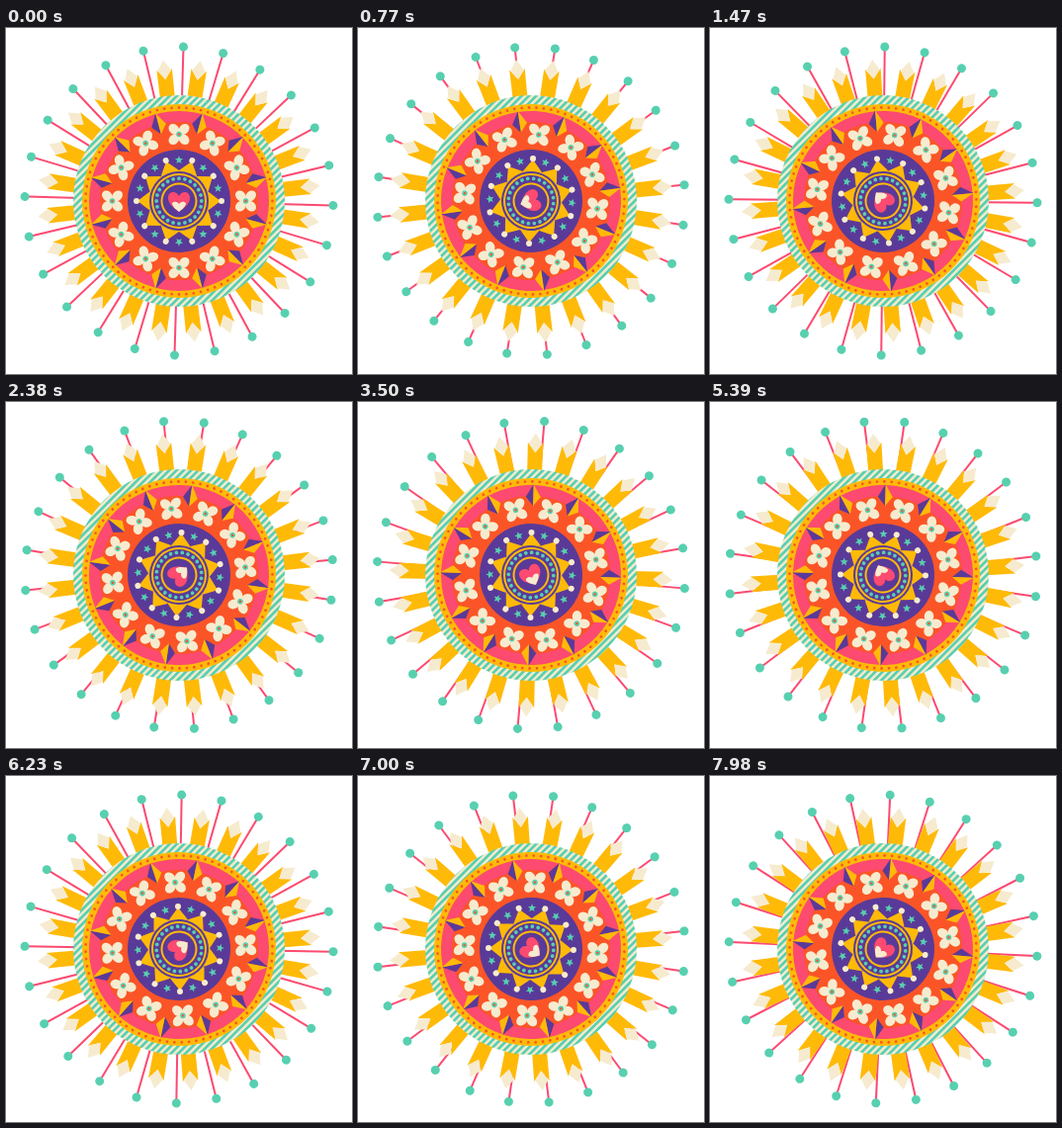
Write an HTML page that moves like this. It is 350 px wide and 350 px high and loops after 8000 ms.

```html
<!DOCTYPE html>
<html lang="en">
<head>
<meta charset="utf-8">
<title>Turning mandala</title>
<style>
  html, body { margin: 0; height: 100%; overflow: hidden; background: #fff; }
  svg { display: block; width: 100vw; height: 100vh; }
</style>
</head>
<body>
<svg viewBox="-175 -175 350 350">
  <defs>
    <pattern id="hatch" width="5.2" height="5.2" patternUnits="userSpaceOnUse" patternTransform="rotate(45)">
      <rect width="5.2" height="5.2" fill="#f6ebcf"/>
      <rect width="2.7" height="5.2" fill="#57d0b0"/>
    </pattern>
  </defs>
</svg>
<script>
const TEAL = '#57d0b0', PINK = '#fc4a70', YELLOW = '#ffba08', CREAM = '#f6ebcf',
      ORANGE = '#fb5527', PURPLE = '#5a3a98';
const STEP = 70, LOOP = 8000;

const svg = document.querySelector('svg');
const layers = [];

const circle = (r, fill, x = 0, y = 0) => `<circle cx="${x}" cy="${y}" r="${r}" fill="${fill}"/>`;
const poly = (points, fill) => `<polygon points="${points}" fill="${fill}"/>`;
const turn = (deg, shape) => `<g transform="rotate(${deg})">${shape}</g>`;
const at = (x, y, shape) => `<g transform="translate(${x} ${y})">${shape}</g>`;
const ring = (count, shape, offset = 0) =>
  Array.from({ length: count }, (_, i) => turn(offset + i * 360 / count, shape)).join('');

// degrees: clockwise turn per step
function layer(content, degrees = 0, start = 0) {
  const group = document.createElementNS('http://www.w3.org/2000/svg', 'g');
  group.innerHTML = content;
  svg.append(group);
  layers.push({ group, degrees, start });
}

const star = (outer, inner, fill) => poly(Array.from({ length: 10 }, (_, i) => {
  const r = i % 2 ? inner : outer, a = i * Math.PI / 5;
  return [r * Math.sin(a), -r * Math.cos(a)].map(v => v.toFixed(2));
}).join(' '), fill);

const pin = `<path d="M0-100V-154" stroke="${PINK}" stroke-width="2"/>` + circle(4.5, TEAL, 0, -156);

const spike = poly('-7.4,-100 -7.8,-134 0,-124 7.8,-134 7.4,-100', YELLOW)
            + poly('0,-143.5 6.8,-133 0,-123.5 -6.8,-133', CREAM);

const petal = `<ellipse cx="7.2" rx="6" ry="4.8" fill="${CREAM}"/>`;
const flower = ring(4, petal, 45) + circle(2.8, TEAL) + circle(1.2, ORANGE);

const kite = poly('0,-92 -7.5,-79 0,-70', PURPLE) + poly('0,-92 7.5,-79 0,-70', YELLOW);

const ray = poly('-9.6,-29.5 0,-42 9.6,-29.5', YELLOW) + circle(3, CREAM, 0, -43);

const heart = `<path d="M0 11C-5 7-11 3-11-3C-11-10-3-11 0-5C3-11 11-10 11-3C11 3 5 7 0 11Z" fill="${PINK}"/>
  <path d="M0 11C-3 8.5-6.5 6-7 2.5C-6 0-2 0 0 3C2 0 6 0 7 2.5C6.5 6 3 8.5 0 11Z" fill="${CREAM}"/>`;

layer(ring(24, pin), 2 / 3, 1.65);
layer(ring(24, spike), -4 / 3, 8.65);
layer(circle(107, 'url(#hatch)'));
layer(circle(98, YELLOW) + ring(80, circle(1.4, ORANGE, 0, -94.5)), -4 / 3);
layer(circle(91, PINK) + circle(80, ORANGE)
  + ring(12, kite, 15) + ring(12, at(0, -67.5, flower)), 10 / 3);
layer(circle(52, PURPLE) + circle(31, YELLOW) + ring(10, ray)
  + ring(10, at(0, -41.5, star(4.3, 1.9, TEAL)), 18), -14 / 3, 18);
layer(circle(30, PURPLE) + circle(28, YELLOW) + circle(26, PURPLE)
  + ring(24, circle(1.9, TEAL, 0, -22.8)), 10 / 3);
layer(circle(18.5, YELLOW) + circle(16.5, PURPLE) + heart, 20 / 3);

function draw(now) {
  const step = Math.floor(now % LOOP / STEP);
  for (const { group, degrees, start } of layers)
    group.setAttribute('transform', `rotate(${start + degrees * step})`);
  requestAnimationFrame(draw);
}
draw(performance.now());
</script>
</body>
</html>
```
